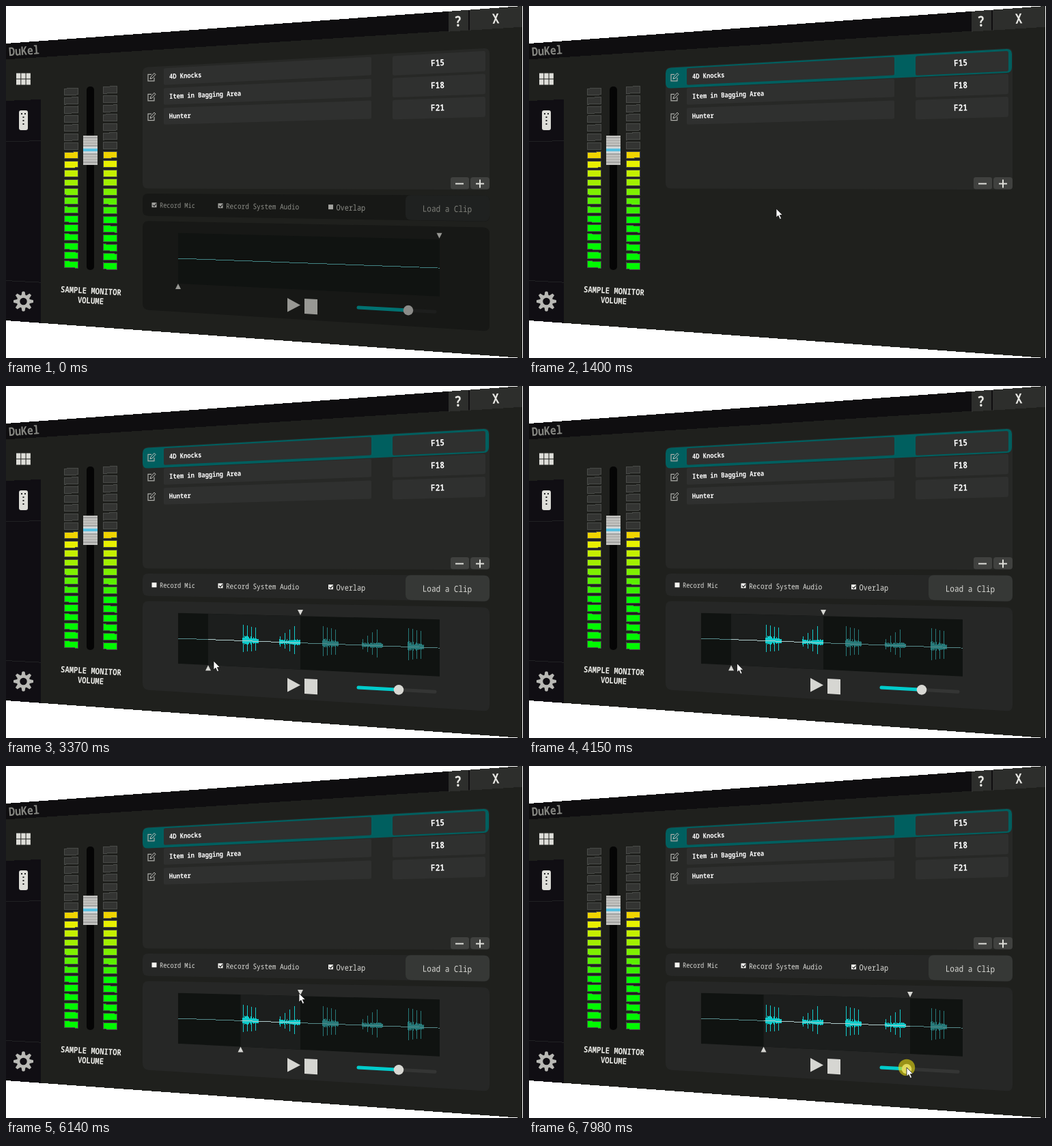
An HTML page that plays this animation: 757 px wide and 516 px high, repeating every 8 s.

```html
<!DOCTYPE html>
<html lang="en">
<head>
<meta charset="utf-8">
<title>Sampler</title>
<style>
html, body { margin: 0; width: 100%; height: 100%; overflow: hidden; background: #fff; }
svg { display: block; width: 757px; height: 516px; }
text { font-family: "Noto Sans Mono", "DejaVu Sans Mono", monospace; dominant-baseline: central; }
.crisp { shape-rendering: crispEdges; }
</style>
</head>
<body>
<svg id="stage" viewBox="0 0 757 516"></svg>
<script>
const LOOP = 8000, WIDTH = 756, TILT = 55, LEFT_HEIGHT = 406;
const FORESHORTEN = 0.86;
const mix = (a, b, k) => a + (b - a) * k;
const clamp01 = k => Math.max(0, Math.min(1, k));

// The window is seen in perspective: v runs from 0 (top edge) to 1 (bottom edge).
const topAt = x => TILT * (1 - x / WIDTH);
const heightAt = x => LEFT_HEIGHT + 2 * TILT * x / WIDTH;
const yAt = (x, v) => topAt(x) + v * heightAt(x);
const vAt = (x, y) => (y - topAt(x)) / heightAt(x);
const angleAt = v => Math.atan((2 * v - 1) * TILT / WIDTH) * 180 / Math.PI;

function poly(points, fill, radius, extra) {
  const n = points.length;
  const toward = ([x, y], [u, w]) => {
    const k = Math.min(0.5, radius / Math.hypot(u - x, w - y));
    return [mix(x, u, k), mix(y, w, k)];
  };
  const d = points.map((p, i) =>
    `${i ? 'L' : 'M'}${toward(p, points[(i + n - 1) % n])}Q${p} ${toward(p, points[(i + 1) % n])}`).join('');
  return `<path d="${d}Z" fill="${fill}" ${extra}/>`;
}

const panel = (x1, x2, v1, v2, fill, radius = 0, extra = '') =>
  poly([[x1, yAt(x1, v1)], [x2, yAt(x2, v1)], [x2, yAt(x2, v2)], [x1, yAt(x1, v2)]], fill, radius, extra);

const rule = (x1, x2, v, stroke, width = 1, extra = '') =>
  `<path d="M${x1} ${yAt(x1, v)}L${x2} ${yAt(x2, v)}" fill="none" stroke="${stroke}" stroke-width="${width}" ${extra}/>`;

function label(x, v, str, charWidth, fill, anchor = 'start', weight = 500) {
  return `<text transform="translate(${x} ${yAt(x, v)}) rotate(${angleAt(v)}) scale(${FORESHORTEN} 1)"
    font-size="${charWidth / 0.6 / FORESHORTEN}" font-weight="${weight}" fill="${fill}" text-anchor="${anchor}">${str}</text>`;
}

function windowFrame() {
  return '<g class="crisp">' + panel(0, WIDTH, 0, 1, '#1f201d') + panel(0, WIDTH, 0, 0.0575, '#0f0e10')
    + panel(0, 51, 0.207, 1, '#100e13') + rule(0, 51, 0.354, '#202123') + rule(0, 51, 0.856, '#202123')
    + panel(648, 677, 0, 0.0595, '#2d2e2c') + panel(679, WIDTH, 0, 0.0595, '#2d2e2c') + '</g>'
    + label(662, 0.03, '?', 11, '#e8e8e4', 'middle', 700) + label(717, 0.03, 'X', 10.5, '#e8e8e4', 'middle', 600)
    + label(4, 0.03, 'DuKel', 9, '#858681', 'start', 600);
}

function sidebarIcons() {
  let s = '';
  for (let i = 0; i < 6; i++) {
    s += `<rect x="${15 + (i % 3) * 7.3}" y="${i > 2 ? 107.5 : 98.5}" width="6.300" height="8" fill="#deded9"/>`;
  }
  s += '<rect x="19" y="153" width="13" height="29" rx="3" fill="#deded9"/>';
  s += '<path d="M22 158h2M27 158h2M24.500 163h2M24.500 168h2M24.500 173h2" stroke="#222" stroke-width="2"/>';
  s += '<circle cx="25.500" cy="433" r="7.500" fill="none" stroke="#b9b9b5" stroke-width="4.500"/>';
  for (let i = 0; i < 8; i++) {
    s += `<path d="M23 424l1-5h3l1 5z" fill="#b9b9b5" stroke="#b9b9b5" transform="rotate(${i * 45} 25.500 433)"/>`;
  }
  return s;
}

function meters() {
  const barColor = i => i < 6 ? '#00fb00' : i < 13 ? `hsl(${mix(106, 53, (i - 6) / 6)} 100% 47%)` : '#333432';
  let s = '<g class="crisp">';
  for (const x of [85, 142.5]) {
    for (let i = 0; i < 20; i++) {
      const v = mix(0.788, 0.1845, i / 19);
      s += panel(x, x + 20, v - 0.0115, v + 0.0115, barColor(i), 0, 'stroke="#494b48"');
    }
  }
  s += '</g><rect x="118" y="118" width="11" height="269" rx="5" fill="#050505"/>';
  s += '<rect x="113" y="190" width="21" height="43" fill="#c3c3c0"/>';
  for (let y = 193, i = 0; y < 232; y += 4, i++) s += `<path d="M113 ${y}h21" stroke="${i % 3 ? '#a2a2a0' : '#808080'}"/>`;
  s += '<path d="M113 211h21" stroke="#cfd6d8" stroke-width="10"/><path d="M113 211h21" stroke="#58bfe0" stroke-width="4"/>';
  return s + label(124.5, 0.875, 'SAMPLE MONITOR', 6.36, '#eeeeea', 'middle', 600)
    + label(124, 0.909, 'VOLUME', 6.36, '#eeeeea', 'middle', 600);
}

const ROWS = [['4D Knocks', 'F15'], ['Item in Bagging Area', 'F18'], ['Hunter', 'F21']];
const ROW_TOP = 0.116, ROW_PITCH = 0.066;

function clipList() {
  let s = panel(200, 708, 0.114, 0.522, '#272826', 8);
  ROWS.forEach(([name, key], i) => {
    const v = ROW_TOP + i * ROW_PITCH, middle = v + 0.0325, y = yAt(212, middle);
    s += panel(200, 707, v, v + 0.069, '#008080', 8, `id="glow${i}"`);
    s += panel(231, 535, v + 0.005, v + 0.0605, '#2f302f', 2, `id="field${i}"`);
    s += panel(566, 702, v + 0.006, v + 0.0645, '#2f302f', 3);
    s += `<path d="M213 ${y - 4}h-5v9.500h9v-5" fill="none" stroke="#aeaeaa" stroke-width="1.200"/>
      <path d="M211 ${y + 2.5}l1-3 5-5.500 2 2-5 5.500z" fill="none" stroke="#c4c4c0"/>`;
    s += label(239, middle, name, 5.27, '#fff', 'start', 600) + label(632, middle, key, 6.7, '#fff', 'middle', 600);
  });
  s += panel(651, 678, 0.486, 0.521, '#40413f', 3) + panel(680, 708, 0.486, 0.521, '#40413f', 4);
  return s + '<path d="M658 260.500h12M688 260.500h12M694 254.500v12" stroke="#deded9" stroke-width="2"/>';
}

const AXIS = 0.753, NOISE_SEED = 43758.5453;
const random = n => Math.abs(Math.sin(n * 12.9898) * NOISE_SEED) % 1;

// Even bursts strike hard and ring out, odd ones build up from soft taps.
function burstHeight(x, burst) {
  const building = burst % 2, length = building ? 30 : 23, gap = building ? 7 : 6;
  const k = x / length;
  if (k < 0 || k > 1) return 0;
  const body = (building ? 5 : 11 * (1 - k * 0.6)) * (0.4 + 0.6 * random(x + burst));
  const strike = Math.floor(x) % gap === 1 && x < 25;
  const peak = building ? mix(8, 30, k) : mix(24, 19, k) + burst;
  return strike ? peak : body;
}

function waveform(color, lineColor, bursts) {
  let bars = '';
  bursts.forEach((start, burst) => {
    for (let i = 0; i < 31; i++) {
      const h = burstHeight(i, burst), x = start + i, y = yAt(x, AXIS);
      if (h) bars += `M${x + 0.5} ${Math.round(y - h)}V${Math.round(y + h * 0.7)}`;
    }
  });
  return `<g class="crisp"><path d="${bars}" stroke="${color}"/>${rule(252, 635, AXIS, lineColor)}</g>`;
}

function option(id, x, str, charWidth, color, boxColor, checked) {
  const v = 0.577, y = yAt(x, v);
  return `<rect x="${x - 3.5}" y="${y - 3.5}" width="7" height="7" fill="${boxColor}"/>
    <path id="${id}" d="M${x - 2} ${y}l2 2 3-4" fill="none" stroke="#222" stroke-width="1.200" ${checked ? '' : 'visibility="hidden"'}/>`
    + label(x + 8, v, str, charWidth, color);
}

const BURSTS = [346, 400, 463, 521, 588];
const SLIDER = 0.8826;

function lowerPanels(id, live) {
  const c = live
    ? { panel: '#262726', button: '#363836', text: '#e0e0dc', load: '#dadad6', box: '#f4f4f0', icon: '#d6d6d2', fill: '#00cccc', track: '#343534', line: '#568b8b' }
    : { panel: '#171816', button: '#1f2120', text: '#8e8f89', load: '#7e7f79', box: '#a3a39f', icon: '#989894', fill: '#007272', track: '#1d1e1d', line: '#438585' };
  const round = 'stroke-linecap="round"';
  let s = `<g id="${id}">`;
  s += panel(200, 708, 0.539, 0.614, c.panel, 8) + panel(585, 708, 0.539, 0.613, c.button, 8);
  s += panel(200, 708, 0.631, 0.93, c.panel, 9);
  s += option(id + 'Mic', 217, 'Record Mic', 5.2, c.text, c.box, true);
  s += option(id + 'Sys', 314, 'Record System Audio', 5.65, c.text, c.box, true);
  s += option(id + 'Lap', 475.5, 'Overlap', 6.1, c.text, c.box, live);
  s += label(646, 0.577, 'Load a Clip', 6.6, c.load, 'middle');
  s += panel(252, 635, 0.669, 0.8365, '#101311') + waveform('#277979', c.line, live ? BURSTS : []);
  if (live) {
    s += `<clipPath id="range"><rect id="rangeBox" y="320" height="120"/></clipPath><g clip-path="url(#range)">
      ${panel(252, 635, 0.669, 0.8365, '#1c1e1d')}${waveform('#12cccc', '#b0cccc', BURSTS)}</g>`;
  }
  s += `<path id="${id}Left" d="M-4 4L0 -4L4 4z" fill="${c.icon}"/><path id="${id}Right" d="M-4 -4L0 4L4 -4z" fill="${c.icon}"/>`;
  s += `<path d="M412 428L431 438.500L412 448.500Z" fill="${c.icon}"/>` + panel(437, 456, 0.864, 0.911, c.icon);
  s += rule(516, 628, SLIDER, c.track, 5, round) + `<g id="${id}Fill">${rule(516, 628, SLIDER, c.fill, 5, round)}</g>`;
  s += `<clipPath id="${id}Level"><rect id="${id}LevelBox" y="430" height="30" x="510"/></clipPath>`;
  return s + `<circle id="${id}Knob" r="7.300" fill="${live ? '#d8d8d3' : '#8b8b88'}"/></g>`;
}

const pointer = `<circle id="press" r="12.200" fill="#e8dc0d" opacity=".6"/>
  <path id="arrow" d="M0 0V13L3 10.300L5.300 15.500L7.600 14.500L5.300 9.500H9.300Z" fill="#fff" stroke="#111" stroke-width=".8"/>
  <path id="beam" d="M-2.500 -6.500H2.500M0 -6.500V6.500M-2.500 6.500H2.500" fill="none" stroke="#e8e8e8" stroke-width="1.200"/>`;

document.getElementById('stage').innerHTML = windowFrame() + sidebarIcons() + meters() + clipList()
  + lowerPanels('idle', false) + lowerPanels('live', true) + pointer;

const el = id => document.getElementById(id);
const show = (id, on) => el(id).setAttribute('visibility', on ? 'visible' : 'hidden');
const place = (id, x, y) => el(id).setAttribute('transform', `translate(${x} ${y})`);
for (const id of ['idle', 'live']) el(id + 'Fill').setAttribute('clip-path', `url(#${id}Level)`);

// Cursor journeys: a drag holds the button down and carries a control along.
const ENTRY = [700, 496];
const JOURNEYS = [
  { from: 60, to: 430, goal: [498, 176] },
  { from: 430, to: 530, goal: [529, 132] },
  { from: 560, to: 830, goal: [540, 92], click: true },
  { from: 1040, to: 1400, goal: [362, 297] },
  { from: 1400, to: 1740, goal: [301, 342] },
  { from: 1780, to: 2200, goal: [227, 290], click: true },
  { from: 2600, to: 3050, goal: [345, 385] },
  { from: 3050, to: 3370, goal: [304, 403] },
  { from: 3410, to: 3780, goal: [425, 345] },
  { from: 3780, to: 4220, goal: [296, 411] },
  { from: 4330, to: 4830, goal: [343.5, 411], drag: 'left' },
  { from: 5100, to: 5340, goal: [426, 325] },
  { from: 5560, to: 5680, goal: [499, 332], drag: 'nothing' },
  { from: 5820, to: 6140, goal: [429, 333] },
  { from: 6360, to: 6720, goal: [558, 334], drag: 'right' },
  { from: 6990, to: 7300, goal: [575, 445] },
  { from: 7400, to: 7960, goal: [553, 442], drag: 'knob' }
];
const SELECT_AT = 990, LOADED_AT = 1520, MIC_OFF_AT = 2350;

function stateAt(t) {
  const s = { x: ENTRY[0], y: ENTRY[1], pressed: false, left: 296, right: 431, knob: 575 };
  for (const { from, to, goal, click, drag } of JOURNEYS) {
    const k = clamp01((t - from) / (to - from)), eased = k * k * (3 - 2 * k);
    s.x = mix(s.x, goal[0], eased);
    s.y = mix(s.y, goal[1], eased);
    if (drag && k > 0) s[drag] = s.x;
    if (click) s.pressed ||= t > to + 110 && t < to + 200;
    if (drag) s.pressed ||= t > from - 50 && t < to + 60;
  }
  return s;
}

function placeControls(id, { left, right, knob }) {
  place(id + 'Left', left, yAt(left, 0.8455));
  place(id + 'Right', right, yAt(right, 0.658));
  place(id + 'Knob', knob, yAt(knob, SLIDER));
  el(id + 'LevelBox').setAttribute('width', knob - 510);
}

function render(t) {
  const s = stateAt(t), { x, y } = s;
  const onStage = t >= 60;
  const row = onStage && x > 200 && x < 707 ? Math.floor((vAt(x, y) - ROW_TOP) / ROW_PITCH) : -1;
  const overField = row >= 0 && row < ROWS.length && x > 231 && x < 535;

  ROWS.forEach((_, i) => {
    show('glow' + i, row === i || (i === 0 && t >= SELECT_AT));
    el('glow' + i).setAttribute('fill', row === i ? '#008080' : '#005f5f');
    el('field' + i).setAttribute('fill', overField && row === i ? '#3e4046' : '#2f302f');
  });

  el('idle').style.display = t < SELECT_AT ? '' : 'none';
  el('live').style.display = t >= LOADED_AT ? '' : 'none';
  show('liveMic', t < MIC_OFF_AT);
  placeControls('live', s);
  el('rangeBox').setAttribute('x', s.left);
  el('rangeBox').setAttribute('width', s.right - s.left);

  show('press', s.pressed);
  show('arrow', onStage && !overField);
  show('beam', overField);
  for (const id of ['press', 'arrow', 'beam']) place(id, x, y);
}

placeControls('idle', { left: 252, right: 634.5, knob: 589 });
const start = performance.now();
function tick() {
  render((performance.now() - start) % LOOP);
  requestAnimationFrame(tick);
}
tick();
</script>
</body>
</html>
```
